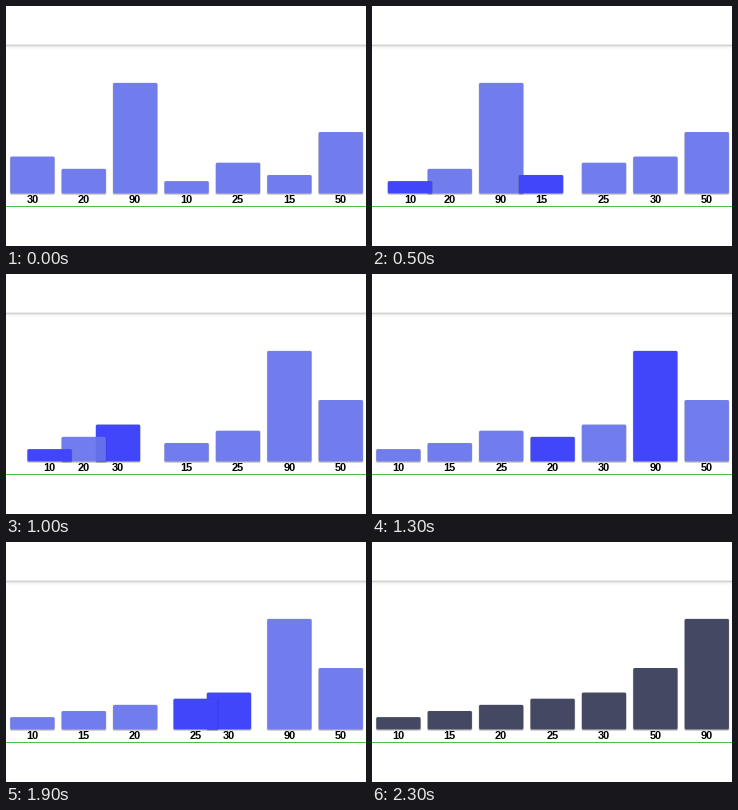
These frames come from a looping animation (360x240 px, 2.4 s). A matplotlib script:

```python
import math

import matplotlib.pyplot as plt
from matplotlib.animation import FuncAnimation
from matplotlib.patches import FancyBboxPatch, Rectangle

W, H, DPI = 360, 240, 100
FRAMES, INTERVAL = 24, 100

VALUES = [30, 20, 90, 10, 25, 15, 50]
PAINT_ORDER = [30, 90, 20, 10, 25, 15, 50]
LEFT, PITCH, BAR_W = 4.3, 51.4, 44.2
BASE, UNIT = 187.4, 1.228

IDLE, ACTIVE, DONE = "#6a77f2", "#4146fa", "#444862"
IDLE_ALPHA = 0.9

# Comb sort: every gap makes one pass of comparisons.
GAPS = [5, 3, 2, 1]
PAIRS = [(i, i + g) for g in GAPS for i in range(len(VALUES) - g)]
STARTS = [0.85, 2.2, 3.6, 5.3, 6.95, 8.35, 9.65, 10.8, 11.9,
          12.98, 14.11, 15.24, 16.37, 17.5, 18.62, 19.82, 21.1]
END = 22.5


def state(t):
    """Return the slot of each value and the pair being compared at time t."""
    order = list(VALUES)
    slots = {}
    active = ()
    for (i, j), start, stop in zip(PAIRS, STARTS, STARTS[1:] + [END]):
        if t < start:
            break
        a, b = order[i], order[j]
        if t >= stop:
            if a > b:
                order[i], order[j] = b, a
            continue
        p = (t - start) / (stop - start)
        if a > b:
            k = (1 - math.cos(math.pi * p)) / 2
        else:
            k = 0.25 * math.sin(math.pi * p) ** 2
        slots = {a: i + (j - i) * k, b: j - (j - i) * k}
        active = (a, b)
        break
    return {**{v: s for s, v in enumerate(order)}, **slots}, active


fig = plt.figure(figsize=(W / DPI, H / DPI), dpi=DPI, facecolor="white")
ax = fig.add_axes([0, 0, 1, 1])
ax.set_xlim(0, W)
ax.set_ylim(H, 0)
ax.axis("off")


def strip(y, h, color):
    ax.add_patch(Rectangle((0, y), W, h, facecolor=color, linewidth=0))


for row, grey in enumerate([0.93, 0.82, 0.92, 0.96, 0.98]):
    strip(38 + row, 1, str(grey))
strip(200, 1, "#4fbf4b")


def box(x, y, w, h, z, **style):
    patch = FancyBboxPatch((x, y), w, h, linewidth=0, zorder=z,
                           boxstyle="round,pad=0,rounding_size=1.5", **style)
    return ax.add_patch(patch)


class Bar:
    def __init__(self, value, z):
        h = value * UNIT
        top = BASE - h
        self.parts = [
            (box(0, top, BAR_W + 1.2, h + 1.6, z, facecolor="black", alpha=0.1), -0.6),
            (box(0, top + 0.5, BAR_W + 0.4, h + 0.5, z + 0.1,
                 facecolor="black", alpha=0.2), -0.2),
        ]
        self.face = box(0, top, BAR_W, h, z + 0.2)
        self.parts.append((self.face, 0))
        self.label = ax.text(0, 197, str(value), ha="center", va="baseline",
                             family="Liberation Sans", weight="bold",
                             size=11 * 72 / DPI, color="black", zorder=50)

    def place(self, slot, color, alpha):
        x = LEFT + PITCH * slot
        for patch, dx in self.parts:
            patch.set_x(x + dx)
        self.face.set_facecolor(color)
        self.face.set_alpha(alpha)
        self.label.set_x(x + BAR_W / 2)


bars = {v: Bar(v, 2 + z) for z, v in enumerate(PAINT_ORDER)}


def draw(t):
    slots, active = state(t)
    for value, bar in bars.items():
        if t >= END:
            look = DONE, 1
        elif value in active:
            look = ACTIVE, 1
        else:
            look = IDLE, IDLE_ALPHA
        bar.place(slots[value], *look)
    return []


anim = FuncAnimation(fig, draw, frames=FRAMES, interval=INTERVAL,
                     init_func=lambda: draw(0), repeat=True, repeat_delay=0)
plt.show()
```
